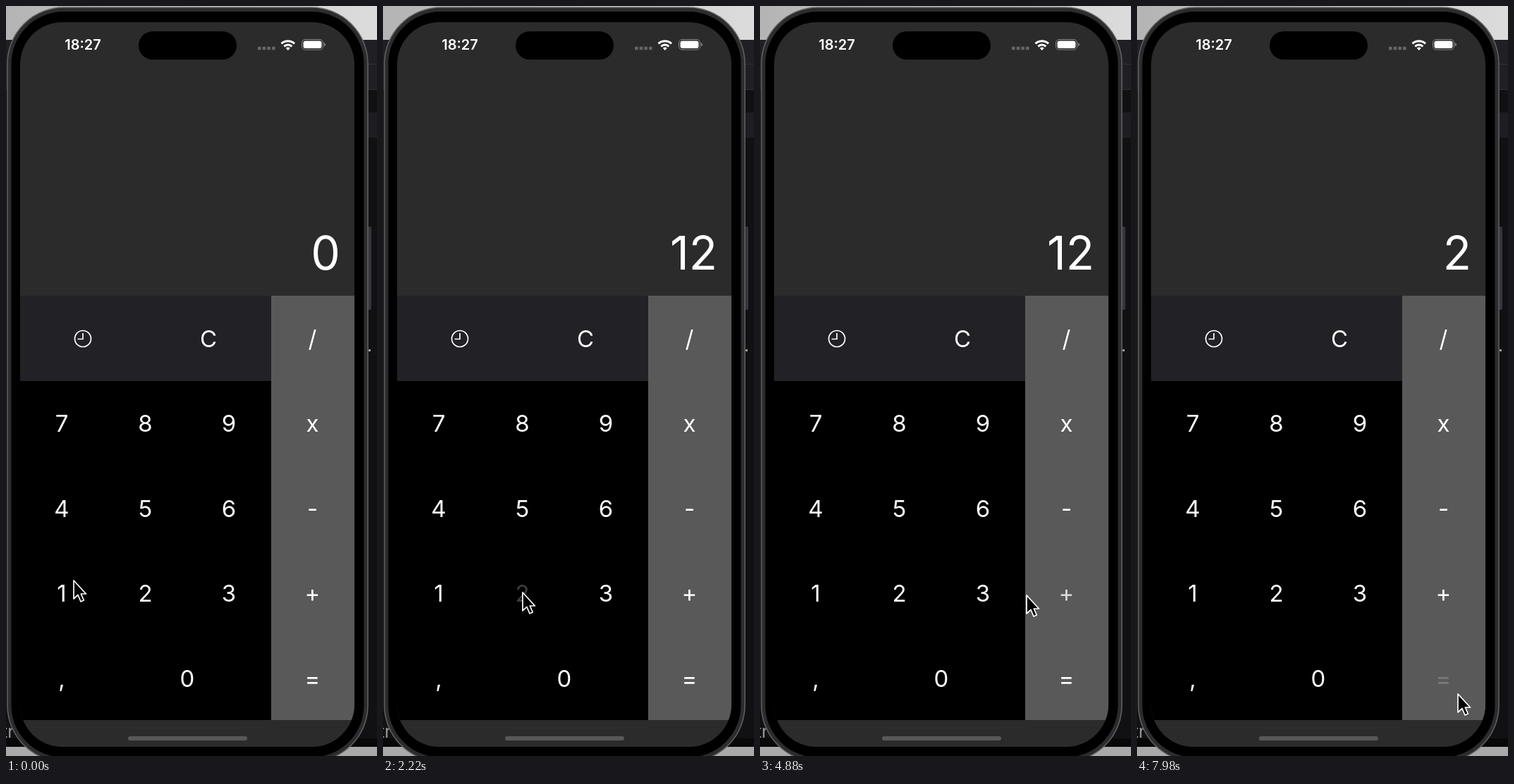
An HTML page that plays this animation: 526 px wide and 1064 px high, repeating every 8000 ms.

```html
<!DOCTYPE html>
<html lang="en">
<head>
<meta charset="utf-8">
<title>Calculator</title>
<style>
  html, body { margin: 0; width: 100%; height: 100%; overflow: hidden; background: #111; }
  svg { display: block; width: 100vw; height: 100vh; }
  text { font: 33px Inter, "Liberation Sans", sans-serif; fill: #fff; text-anchor: middle; }
  #time { font-size: 20px; font-weight: 600; }
  #display { font-size: 66px; text-anchor: end; }
  #behind { font-size: 25px; fill: #999; text-anchor: start; }
</style>
</head>
<body>
<svg viewBox="0 0 526 1064">
  <defs>
    <linearGradient id="bar"><stop stop-color="#b4b4b4"/><stop offset="1" stop-color="#dcdcdc"/></linearGradient>
    <clipPath id="screen"><rect x="20" y="23" width="474" height="1028" rx="60"/></clipPath>
  </defs>

  <!-- desktop behind the phone -->
  <rect width="526" height="1064" fill="#111113"/>
  <rect width="526" height="48" fill="url(#bar)"/>
  <rect y="48" width="526" height="71" fill="#202024"/>
  <path d="M500 82.5h26M500 118.5h26" stroke="#303036"/>
  <rect x="500" y="151" width="26" height="36" fill="#1d1d22"/>
  <rect y="1039" width="526" height="12" fill="#080808"/>
  <rect y="1051" width="526" height="13" fill="#aaa"/>
  <text id="behind" x="-6" y="1038">tr</text>
  <rect x="514" y="487" width="3" height="3" fill="#999"/>

  <!-- phone -->
  <rect x="511" y="313" width="7" height="118" rx="2" fill="#36343d"/>
  <rect x="2" y="2" width="511" height="1070" rx="80" fill="#2c2c2e" stroke="#626264" stroke-width="1.5"/>
  <rect x="7.500" y="8" width="500" height="1058" rx="74" fill="#000"/>
  <g clip-path="url(#screen)">
    <rect x="20" y="23" width="474" height="1028" fill="#2b2b2b"/>
    <rect x="20" y="411" width="356" height="121" fill="#222126"/>
    <rect x="20" y="532" width="356" height="481" fill="#000"/>
    <rect x="376" y="411" width="118" height="602" fill="#595959"/>
  </g>
  <rect x="188" y="36" width="139" height="40" rx="20" fill="#000"/>
  <rect x="173" y="1036" width="169" height="6" rx="3" fill="#58585a"/>

  <!-- status bar -->
  <text id="time" x="109" y="62">18:27</text>
  <path d="M357 60h26" stroke="#666" stroke-width="4.500" stroke-dasharray="4.500 2.200"/>
  <g fill="none" stroke="#fff" stroke-width="3">
    <path d="M390.500 53.300a13.500 13.500 0 0 1 18.500 0M394.300 57.300a8 8 0 0 1 11 0"/>
    <path d="M399.800 63l-3-3.200a4.400 4.400 0 0 1 6 0z" fill="#fff" stroke="none"/>
  </g>
  <rect x="419.500" y="47.500" width="30" height="14.500" rx="4.500" fill="none" stroke="#888"/>
  <rect x="421.500" y="49.500" width="26" height="10.500" rx="3" fill="#fff"/>
  <path d="M451.500 52.500q2 2.200 0 4.500z" fill="#888" stroke="#888"/>

  <text id="display" x="474" y="374">0</text>
  <g fill="none" stroke="#fff" stroke-width="1.700">
    <circle cx="109" cy="472" r="11.500"/>
    <path d="M109 464v8.500h-7.500"/>
  </g>
  <g id="keys"></g>
  <path id="cursor" d="M0 0V26L6 20.500L10 30L14.300 28L10.300 19H17.500Z" fill="#000" stroke="#fff" stroke-width="1.700" stroke-linejoin="round"/>
</svg>
<script>
const LOOP = 8000, FADE_IN = 300, FADE_OUT = 600;
const $ = id => document.getElementById(id);
const keys = {};

function addKey(label, x, row) {
  const el = document.createElementNS("http://www.w3.org/2000/svg", "text");
  el.textContent = label;
  el.setAttribute("x", x);
  el.setAttribute("y", 484 + row * 120.4);
  $("keys").append(el);
  keys[label] = el;
}

["789", "456", "123"].forEach((line, r) =>
  [...line].forEach((d, c) => addKey(d, 79 + c * 118.5, r + 1)));
[..."/x-+="].forEach((op, r) => addKey(op, 434.500, r));
addKey("C", 287, 0);
addKey(",", 79, 4);
addKey("0", 257, 4);

// key, press time, release time, display after release
const presses = [
  ["1", 450, 950, "1"],
  ["2", 1680, 2130, "12"],
  ["+", 4030, 4500, "12"],
  ["2", 5620, 6090, "2"],
  ["=", 7560, 8200, "14"]
];

// time, x, y of the pointer tip
const path = [
  [0, 96, 815], [1000, 97, 816], [1395, 195, 831], [2300, 198, 832],
  [2920, 377, 749], [3600, 418, 832], [4580, 420, 833], [4880, 378, 836],
  [5450, 208, 815], [6350, 208, 814], [7350, 455, 976], [LOOP, 455, 976]
];

const clamp = v => Math.min(1, Math.max(0, v));
const ease = p => p < .5 ? 2 * p * p : 1 - 2 * (1 - p) ** 2;

function opacity(t, down, up) {
  return 1 - .8 * (ease(clamp((t - down) / FADE_IN)) - ease(clamp((t - up) / FADE_OUT)));
}

function draw(t) {
  let shown = "0";
  const alpha = {};
  for (const [key, down, up, result] of presses) {
    alpha[key] = Math.min(alpha[key] ?? 1, opacity(t, down, up));
    if (t >= up) shown = result;
  }
  for (const key in alpha) keys[key].setAttribute("opacity", alpha[key]);
  $("display").textContent = shown;

  const i = path.findIndex(p => p[0] > t);
  const [t0, x0, y0] = path[i - 1], [t1, x1, y1] = path[i];
  const p = ease((t - t0) / (t1 - t0));
  $("cursor").setAttribute("transform", `translate(${x0 + (x1 - x0) * p} ${y0 + (y1 - y0) * p})`);
}

const start = performance.now();
function tick() {
  draw((performance.now() - start) % LOOP);
  requestAnimationFrame(tick);
}
tick();
</script>
</body>
</html>
```
